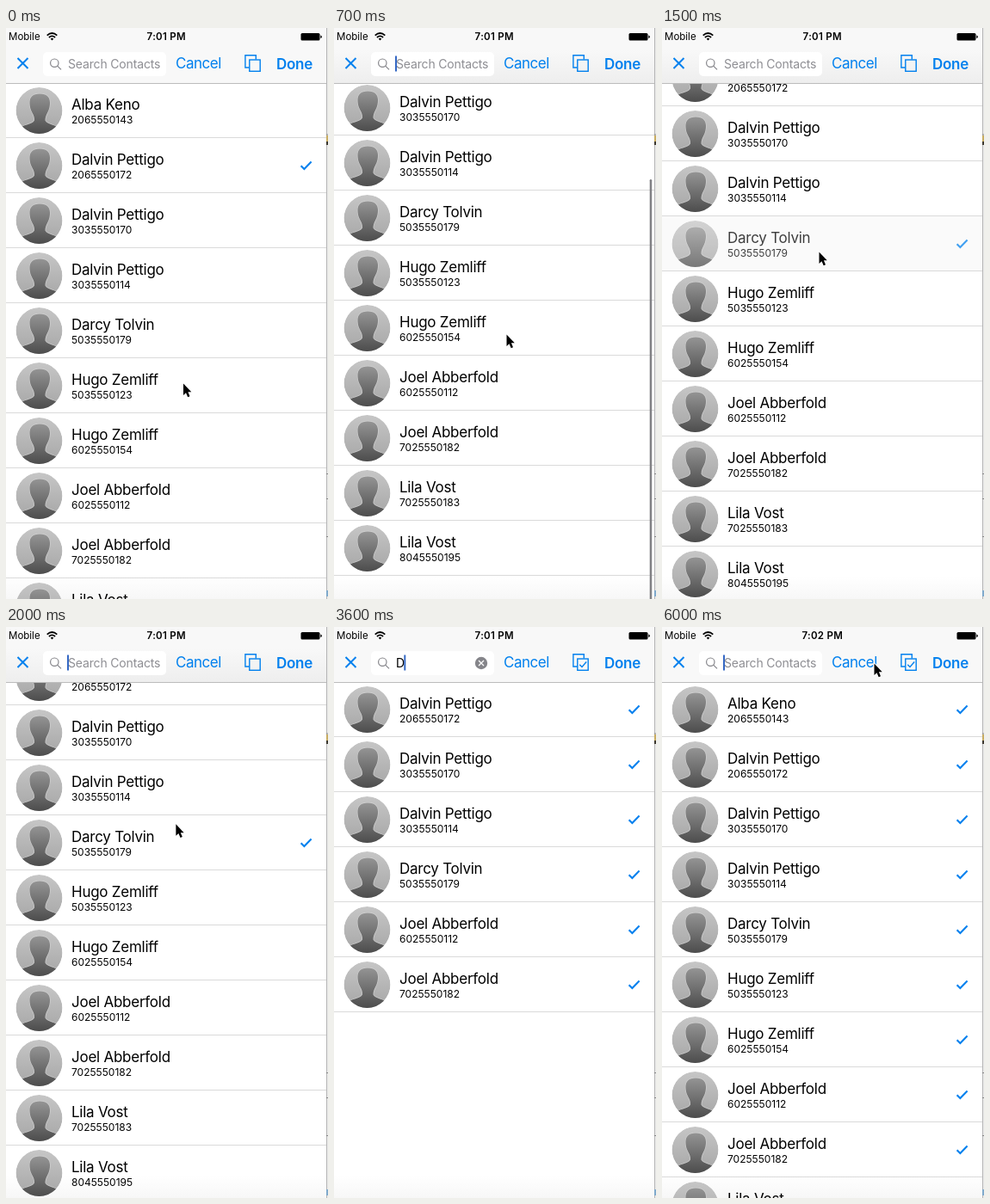
These frames come from a looping animation (374x664 px, 6.1 s). An HTML page:

```html
<!DOCTYPE html>
<html lang="en">
<head>
<meta charset="utf-8">
<title>Contact picker</title>
<style>
  html, body { margin: 0; width: 100%; height: 100%; overflow: hidden; background: #fff; }
  svg { display: block; width: 374px; height: 664px; font-family: Inter, Roboto, sans-serif; }
  .name { font-size: 17px; letter-spacing: -.25px; }
  .phone { font-size: 12px; }
  .status { font-size: 11.5px; }
  .action { font-size: 17px; letter-spacing: -.5px; fill: #0080ee; }
  .strong { font-weight: 600; letter-spacing: -.3px; }
  .field { font-size: 14px; letter-spacing: -.16px; }
  .tint { fill: none; stroke: #0080ee; }
</style>
</head>
<body>
<svg viewBox="0 0 374 664">
  <defs>
    <linearGradient id="back" x2="0" y2="1">
      <stop stop-color="#c6c6c6"/><stop offset="1" stop-color="#a6a6a6"/>
    </linearGradient>
    <linearGradient id="body" x2="0" y2="1">
      <stop stop-color="#949494"/><stop offset="1" stop-color="#484848"/>
    </linearGradient>
    <linearGradient id="bar" x2="0" y2="1">
      <stop offset=".4" stop-color="#f8f8f8"/><stop offset="1" stop-color="#eeeeee"/>
    </linearGradient>
    <linearGradient id="foot" x2="0" y2="1">
      <stop stop-color="#fff"/><stop offset="1" stop-color="#f7f7f7"/>
    </linearGradient>
    <clipPath id="round"><circle r="27"/></clipPath>
    <clipPath id="page"><rect y="64" width="372" height="600"/></clipPath>
    <g id="avatar" clip-path="url(#round)">
      <circle r="27" fill="url(#back)"/>
      <path d="M-23 30V22C-20 16-8 16.500-5.500 11.500C-5 5-9.500 2-10.500-4C-12.500-14-9-19.500 .7-19.500C10.500-19.500 14-14 12-4C11 2 7 5 7 11.500C9.500 16.500 20 16 23 22V30Z"
        fill="url(#body)" stroke="#d4d4d4" stroke-opacity=".75" stroke-width="1.400" paint-order="stroke"/>
    </g>
  </defs>

  <rect width="374" height="664" fill="#fff"/>
  <rect y="638" width="372" height="26" fill="url(#foot)"/>
  <g id="list" clip-path="url(#page)"></g>
  <rect id="thumb" x="366.700" width="2.500" height="600" rx="1.250" fill="#808084"/>

  <rect width="372" height="64" fill="#f8f8f8"/>
  <rect id="shade" width="372" height="64" fill="url(#bar)"/>
  <path d="M0 64.500H372" stroke="#bcbcbc"/>

  <text class="status" x="3" y="14.300">Mobile</text>
  <g fill="none" stroke="#000" stroke-width="1.700">
    <path d="M47.700 8.700Q53.500 3.300 59.300 8.700M49.900 11Q53.500 7.700 57.100 11"/>
    <path d="M53.500 14.500L51.700 12.500Q53.500 11 55.300 12.500Z" fill="#000" stroke="none"/>
  </g>
  <text id="clock" class="status" x="186.300" y="14.300" text-anchor="middle" font-weight="600" letter-spacing=".3"></text>
  <rect x="342.500" y="6" width="22" height="8.500" rx="1.500"/>
  <path d="M365.300 8.500Q366.800 8.700 366.800 10.300T365.300 12Z"/>

  <path class="tint" stroke-width="2" d="M13.500 35L25.500 47M25.500 35L13.500 47"/>
  <rect x="43" y="28" width="143" height="28" rx="5" fill="#fff"/>
  <g fill="none" stroke="#85858a" stroke-width="1.200">
    <circle cx="56.300" cy="40.700" r="4.700"/><path d="M59.700 44.100L64 48.400"/>
  </g>
  <text id="query" class="field" x="72" y="46.500"></text>
  <rect id="caret" y="32.500" width="2" height="18" fill="#3568c4"/>
  <g id="clear">
    <circle cx="171" cy="42" r="7.200" fill="#85858a"/>
    <path d="M168 39L174 45M174 39L168 45" stroke="#fff" stroke-width="1.200"/>
  </g>
  <text class="action" x="197" y="47.300">Cancel</text>
  <g class="tint" stroke-width="1.400">
    <path d="M282.500 46H277.900V31.800H290.300V36.500"/>
    <rect x="282.800" y="37" width="12.400" height="13.300"/>
    <path id="all" d="M285.300 43.700L288 46.400L293.200 40.500"/>
  </g>
  <text class="action strong" x="314" y="48">Done</text>

  <g id="edge">
    <path d="M372.500 0V664" stroke="#b4b4b4"/>
    <path d="M373.500 0V664" stroke="#ececec"/>
    <path d="M372 124H374M372 518.500H374M372 547.500H374M372 591.500H374" stroke="#858585"/>
    <rect x="372" y="125" width="2" height="7" fill="#c9ad62"/>
    <rect x="372" y="132" width="2" height="4" fill="#3c3830"/>
    <rect x="372" y="654" width="2" height="7" fill="#7fa9cc"/>
  </g>
  <path id="mouse" d="M.5 .5V14L3.500 11.200L5.700 16.200L8 15.200L5.900 10.300H9.800Z"
    stroke="#fff" stroke-width="2" paint-order="stroke"/>
</svg>
<script>
const LOOP = 6100, STEP = 100, ROW = 64, REST = 101;
const CHECK_ONE = 1400, CHECK_ALL = 2700, TYPE = 3400, CLEAR = 5500;

const people = [
  ["Alba Keno", "2065550143"], ["Dalvin Pettigo", "2065550172"],
  ["Dalvin Pettigo", "3035550170"], ["Dalvin Pettigo", "3035550114"],
  ["Darcy Tolvin", "5035550179"], ["Hugo Zemliff", "5035550123"],
  ["Hugo Zemliff", "6025550154"], ["Joel Abberfold", "6025550112"],
  ["Joel Abberfold", "7025550182"], ["Lila Vost", "7025550183"],
  ["Lila Vost", "8045550195"]
];

// Each track lists [time, value, ...].
const scrollKeys = [[0, 0], [100, 7], [300, 62], [500, 116], [700, 131], [900, 118], [1100, 102], [1300, REST]];
const mouseKeys = [[0, 205.5, 413], [200, 205, 405], [700, 200, 356], [1100, 185, 266], [1400, 182, 260],
  [1900, 182, 260], [2600, 286, 42], [2800, 286, 42], [3100, 225, 24], [3400, 150, 44],
  [4600, 174, 44], [5500, 174, 44], [6000, 246, 42]];
const caretSpans = [[500, 1200], [1700, 2200], [2700, 3200], [3400, 4300], [5600, 6100]];

const $ = id => document.getElementById(id);
const show = (el, on) => el.setAttribute("visibility", on ? "visible" : "hidden");
const within = (t, a, b) => t >= a && t < b;

function make(tag, attrs, parent, text) {
  const el = document.createElementNS("http://www.w3.org/2000/svg", tag);
  for (const k in attrs) el.setAttribute(k, attrs[k]);
  if (text) el.textContent = text;
  parent.appendChild(el);
  return el;
}

function track(keys, t) {
  let i = 1;
  while (i < keys.length - 1 && keys[i][0] < t) i++;
  const a = keys[i - 1], b = keys[i];
  const p = Math.min(1, Math.max(0, (t - a[0]) / (b[0] - a[0])));
  return a.slice(1).map((v, k) => v + (b[k + 1] - v) * p);
}

const rows = people.map(([name, phone]) => {
  const g = make("g", {}, $("list"));
  const glow = make("rect", { width: 372, height: ROW, fill: "#d9d9d9" }, g);
  const info = make("g", {}, g);
  make("use", { href: "#avatar", transform: "translate(38.5 32)" }, info);
  make("text", { class: "name", x: 76, y: 31 }, info, name);
  make("text", { class: "phone", x: 76, y: 47.2 }, info, phone);
  const tick = make("path", { class: "tint", "stroke-width": 2.1, d: "M342.6 32.2L346.4 36L354.6 27.6" }, info);
  make("path", { d: "M0 63.500H372", stroke: "#dadada" }, g);
  return { g, glow, info, tick, key: name.toLowerCase() };
});

function typed(t) {
  if (!within(t, TYPE, CLEAR)) return "";
  return "Dad".slice(0, t < 3700 ? 1 : t < 4700 ? 2 : 3);
}

function draw(t) {
  const word = typed(t);
  const scroll = t < TYPE ? track(scrollKeys, t)[0] : 0;
  let place = 0;
  rows.forEach((r, i) => {
    const match = r.key.includes(word.toLowerCase());
    r.g.setAttribute("display", match ? "inline" : "none");
    if (match) r.g.setAttribute("transform", `translate(0 ${ROW + place++ * ROW - scroll})`);
    show(r.tick, i === 1 || t >= CHECK_ALL || (i === 4 && t >= CHECK_ONE));
    const press = i === 4 ? (within(t, 1300, 1500) ? 1 : within(t, 1500, 1600) ? .15 : 0) : 0;
    r.glow.setAttribute("opacity", press);
    r.info.setAttribute("opacity", press === .15 ? .75 : 1);
  });

  const over = Math.max(0, scroll - REST);
  $("thumb").setAttribute("y", 64 + Math.min(scroll, REST) * 82 / REST + over);
  $("thumb").setAttribute("opacity", within(t, 100, 1300) ? 1 : within(t, 1300, 1400) ? .5 : 0);
  show($("shade"), scroll > 0);

  $("clock").textContent = t < 5200 ? "7:01 PM" : "7:02 PM";
  $("query").textContent = word || "Search Contacts";
  $("query").setAttribute("fill", word ? "#000" : "#8e8e93");
  show($("clear"), word);
  show($("all"), t >= CHECK_ALL);

  const lit = caretSpans.some(([a, b]) => within(t, a, b));
  $("caret").setAttribute("opacity", lit ? 1 : within(t, 4300, 4400) ? .45 : 0);
  $("caret").setAttribute("x", [71, 81.3, 89, 98][word.length]);

  const [x, y] = track(mouseKeys, t);
  $("mouse").setAttribute("transform", `translate(${x} ${y})`);
  show($("mouse"), !within(t, TYPE, 4700));
}

const start = performance.now();
function tick() {
  const t = Math.max(0, performance.now() - start) % LOOP;
  draw(Math.floor(t / STEP) * STEP);
  requestAnimationFrame(tick);
}
tick();
</script>
</body>
</html>
```
